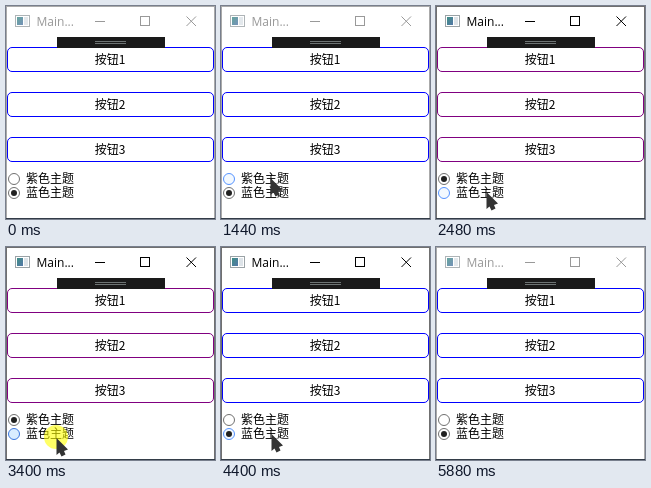
An HTML page for the animation above (5960 ms loop, 209 by 213 pixels).

```html
<!DOCTYPE html>
<html lang="zh">
<head>
<meta charset="utf-8">
<title>Theme switch</title>
<style>
  html, body { margin: 0; width: 100%; height: 100%; overflow: hidden; background: #fff; }
  svg { display: block; width: 209px; height: 213px; }
  text { font: 12px "Noto Sans CJK SC", "Noto Sans CJK", sans-serif; fill: #000; }
  #title { font: 12px "Open Sans", "Noto Sans", sans-serif; fill: var(--ink); }
  #chrome { fill: none; stroke: var(--ink); }
  #frame { fill: none; stroke: var(--edge); }
  .button { fill: #fff; stroke: var(--theme); }
  .ring { fill: #fff; stroke: #707070; }
  .dot { fill: #212121; visibility: hidden; }
  .on .dot { visibility: visible; }
  .hover .ring { fill: #f3f9ff; stroke: #5593ff; }
  .press .ring { fill: #d9ecff; stroke: #3c77dd; }
</style>
</head>
<body>
<svg id="stage" viewBox="0 0 209 213">
  <defs>
    <linearGradient id="pane" x2="1" y2="1">
      <stop offset="0" stop-color="#3f8f86"/>
      <stop offset="1" stop-color="#5577a8"/>
    </linearGradient>
  </defs>
  <rect width="209" height="213" fill="#fff"/>
  <rect id="frame" x=".5" y=".5" width="208" height="212"/>
  <path d="M0 212.5h209" stroke="#333c48"/>

  <g id="icon">
    <rect x="9.5" y="9.5" width="14" height="11" fill="#fff" stroke="#9aa2a6"/>
    <rect x="11" y="11" width="6" height="8" fill="url(#pane)"/>
    <rect x="18" y="11" width="4" height="8" fill="#dde3e8"/>
  </g>
  <text id="title" x="30.5" y="20">Main...</text>
  <g id="chrome">
    <path d="M89 15.5h10"/>
    <rect x="134.5" y="10.5" width="9" height="9"/>
    <path d="M180.5 10.5l9.5 9.5m0-9.5l-9.5 9.5"/>
  </g>

  <g id="buttons"></g>

  <rect x="51" y="31" width="108" height="11" fill="#1a1a1a"/>
  <path d="M89 35.5h31M89 37.5h31" stroke="#6d7373"/>

  <g id="radios"></g>

  <g id="mouse">
    <circle id="glow" r="12" fill="#ff0"/>
    <path d="M.5 1V18L3.5 15.5 5.5 19.5 9.5 17.5 8 14 12 12.5Z" fill="#333"/>
  </g>
</svg>
<script>
const LOOP = 5960, STEP = 80;
const PURPLE = 0, BLUE = 1;
const COLORS = ["#800080", "#0000ff"];
const ENTER = 440, LEAVE = 5080;
const FOCUS = 2240, BLUR = 5880;
const CLICKS = [{ time: 2240, theme: PURPLE }, { time: 3400, theme: BLUE }];
const ENTRY = [99, 207];
// Pointer moves: start, end, destination
const MOVES = [
  [440, 1000, [54, 175]],
  [1280, 1440, [49, 171]],
  [2240, 2560, [50, 190]],
  [4320, 4480, [50, 182]],
  [4560, 4800, [49, 172]],
  [4880, 5080, [204, 197]]
];
const $ = id => document.getElementById(id);

$("buttons").innerHTML = [1, 2, 3].map((n, i) => {
  const y = 41.5 + i * 45;
  return `<rect class="button" x="1.5" y="${y}" width="206" height="24" rx="4.5"/>
    <text x="104" y="${y + 16.5}" text-anchor="middle">按钮${n}</text>`;
}).join("");

$("radios").innerHTML = ["紫色主题", "蓝色主题"].map((label, i) => {
  const y = 173 + i * 14;
  return `<g class="radio"><circle class="ring" cx="8" cy="${y}" r="5.5"/>
    <circle class="dot" cx="8" cy="${y}" r="3"/>
    <text x="20" y="${y + 4}">${label}</text></g>`;
}).join("");
const radios = [...document.querySelectorAll(".radio")];

// The pointer is sampled every STEP ms while it moves
function pointerAt(t) {
  let pos = ENTRY;
  for (const [start, end, to] of MOVES) {
    if (t < start) break;
    const k = Math.min(1, Math.floor((t - start) / STEP) * STEP / (end - start));
    pos = pos.map((p, i) => p + (to[i] - p) * k);
  }
  return pos.map(Math.round);
}

function draw(t) {
  const [x, y] = pointerAt(t);
  const shown = t >= ENTER && t < LEAVE;
  const over = shown && x < 70 && y < 194 ? (y < 180 ? PURPLE : BLUE) : -1;
  const focus = t >= FOCUS && t < BLUR;

  let theme = BLUE, down = false, glow = 0;
  for (const click of CLICKS) {
    const age = Math.floor((t - click.time) / STEP);
    if (age < 0) continue;
    if (age === 0) down = true;
    else theme = click.theme;
    glow = Math.max(0, .6 * (1 - age / 2));
  }

  const style = $("stage").style;
  style.setProperty("--ink", focus ? "#000" : "#999");
  style.setProperty("--edge", focus ? "#707070" : "#aaa");
  style.setProperty("--theme", COLORS[theme]);
  $("icon").setAttribute("opacity", focus ? 1 : .8);

  radios.forEach((r, i) => {
    r.classList.toggle("on", i === theme);
    r.classList.toggle("hover", i === over);
    r.classList.toggle("press", i === over && down);
  });

  $("mouse").style.visibility = shown ? "visible" : "hidden";
  $("mouse").setAttribute("transform", `translate(${x} ${y})`);
  $("glow").setAttribute("opacity", glow);
}

const start = performance.now();
function tick() {
  draw((performance.now() - start) % LOOP);
  requestAnimationFrame(tick);
}
tick();
</script>
</body>
</html>
```
